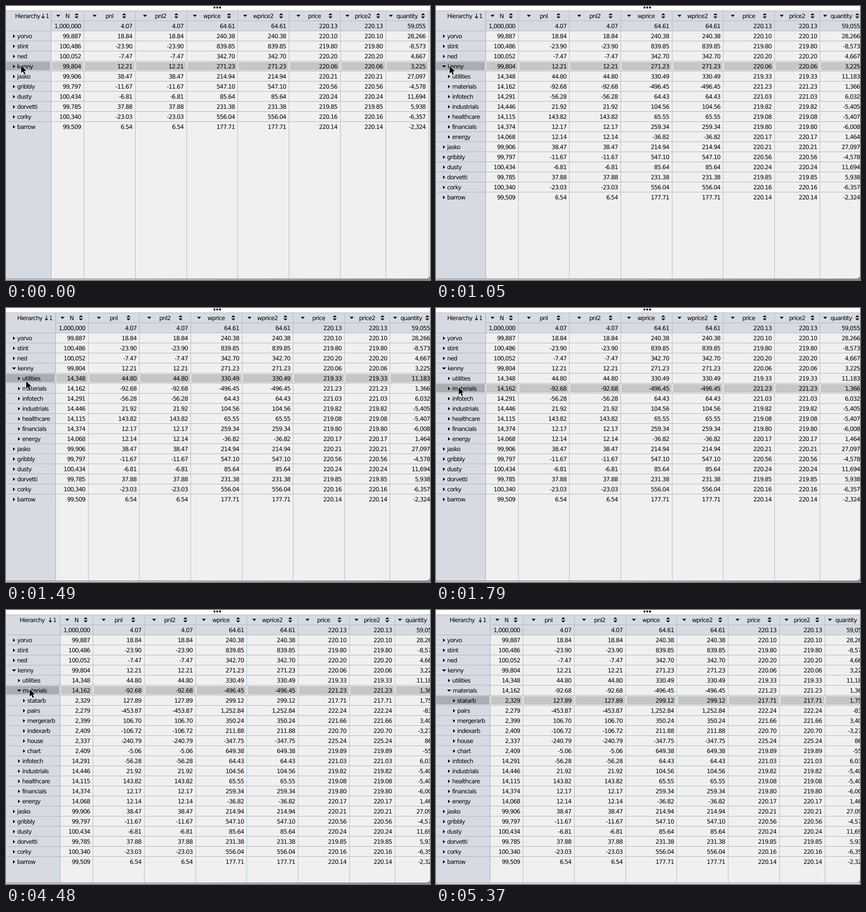
An HTML page for the animation above (8000 ms loop, 841x544 px).

```html
<!DOCTYPE html>
<html lang="en">
<head>
<meta charset="utf-8">
<title>Hierarchy table</title>
<style>
  html, body { margin: 0; width: 100%; height: 100%; overflow: hidden; background: #fff; }
  svg { display: block; }
  text {
    font: 11.7px "DejaVu Sans", Tahoma, sans-serif;
    letter-spacing: -.75px;
    text-rendering: geometricPrecision;
    white-space: pre;
  }
  .num { text-anchor: end; }
  .mid { text-anchor: middle; }
</style>
</head>
<body>
<svg id="stage" width="841" height="544" viewBox="0 0 841 544"></svg>
<script>
const stage = document.getElementById('stage');
const W = 841, TOP = 9, ROW = 20, BOTTOM = 541, LOOP = 8000;

// Leaves: name, count, pnl, weighted price, price, quantity. Parents are summed up below.
const outline = `
all
 yorvo 99887 18.84 240.376 220.10 28266
 stint 100486 -23.90 839.85 219.80 -8573
 ned 100052 -7.47 342.70 220.20 4667
 kenny
  utilities 14348 44.80 330.486 219.33 11183
  materials
   statarb 2329 127.89 299.12 217.71 1752
   pairs 2279 -453.87 1252.84 222.24 -832
   mergerarb 2399 106.70 350.24 221.66 3405
   indexarb 2409 -106.72 211.88 220.70 -3270
   house 2337 -240.79 -347.75 225.24 864
   chart 2409 -5.06 649.38 219.89 -553
  infotech 14291 -56.28 64.43 221.03 6032
  industrials 14446 21.92 104.56 219.82 -5405
  healthcare 14115 143.82 65.55 219.08 -5407
  financials 14374 12.17 259.34 219.80 -6008
  energy 14068 12.14 -36.82 220.17 1464
 jasko 99906 38.47 214.94 220.21 27097
 gribbly 99797 -11.67 547.10 220.56 -4578
 dusty 100434 -6.81 85.64 220.24 11694
 dorvetti 99785 37.88 231.38 219.85 5938
 corky 100340 -23.03 556.04 220.16 -6357
 barrow 99509 6.54 177.71 220.14 -2324`;

function parse(source) {
  const path = [];
  const nodes = source.trim().split('\n').map(line => {
    const depth = line.search(/\S/);
    const [name, ...cells] = line.trim().split(' ');
    const [N, pnl, wprice, price, quantity] = cells.map(Number);
    const node = { name, depth, kids: [], N, pnl, wprice, price, quantity };
    if (depth) path[depth - 1].kids.push(node);
    return path[depth] = node;
  });
  return nodes;
}

// Counts and quantities add up; the rest are weighted means.
function aggregate(node) {
  if (!node.kids.length) return;
  node.kids.forEach(aggregate);
  const sum = f => node.kids.reduce((total, kid) => total + f(kid), 0);
  node.N = sum(k => k.N);
  node.quantity = sum(k => k.quantity);
  for (const key of ['pnl', 'price']) node[key] = sum(k => k[key] * k.N) / node.N;
  node.wprice = sum(k => k.wprice * k.quantity) / node.quantity;
}

const nodes = parse(outline);
const [root, ...rows] = nodes;
aggregate(root);

const pen = document.createElement('canvas').getContext('2d');
pen.font = '11.7px "DejaVu Sans", Tahoma, sans-serif';
const textWidth = s => pen.measureText(s).width - .75 * s.length;

// Menu arrow, label and sorter are spaced evenly inside each heading.
const FIRST = 89.4, ICON = 10;
const widths = { N: 64.8, price2: 90.2, quantity: 84.9 };
let edge = FIRST;
const columns = ['N', 'pnl', 'pnl2', 'wprice', 'wprice2', 'price', 'price2', 'quantity'].map(name => {
  const left = edge;
  const width = widths[name] || 101.68;
  edge += width;
  const pad = (width - textWidth(name) - 2 * ICON) / 4 + ICON / 2;
  return { name, key: name.replace('2', ''), right: edge,
           menu: left + pad, mid: left + width / 2, sort: edge - pad };
});

const shifts = [0, 8.5, 18];
const opens = [[0, 0], [1050, 1], [2540, 2]];
const picks = [[0, 'kenny'], [1490, 'utilities'], [1640, 'materials'], [4630, 'statarb']];
const pointer = [
  [0, 30, 118], [300, 26, 120], [750, 27, 119], [1190, 18, 120], [1340, 20, 124],
  [1490, 40, 145], [1640, 36, 148], [1790, 45, 157], [4480, 47, 157], [4630, 765, 182], [4770]
];
const SETTLED = 5370;

const rect = (x, y, w, h, fill) =>
  `<rect x="${x}" y="${y}" width="${w}" height="${h}" fill="${fill}"/>`;
const path = (d, x, y, extra = '') =>
  `<path transform="translate(${x} ${y})" d="${d}" ${extra}/>`;
const text = (s, x, y, cls = '') => `<text class="${cls}" x="${x}" y="${y}">${s}</text>`;

const DOWN = 'M-4 -2H4L0 2.2Z';
const RIGHT = 'M-2 -3.5V3.5L2 0Z';
const SORT = 'M-4 -1.2L0 -5.2L4 -1.2ZM-4 1.2L0 5.2L4 1.2Z';
const ORDER = 'M0 -4.5V4.5M-2.8 1.5L0 4.7L2.8 1.5';
const POINTER = 'M0 0V15L3.5 11.8L6 17.4L8.4 16.3L6 10.8H10.6Z';

function format(node, key) {
  const digits = key === 'N' || key === 'quantity' ? 0 : 2;
  return node[key].toLocaleString('en-US',
    { minimumFractionDigits: digits, maximumFractionDigits: digits });
}
const values = (node, y, shift) =>
  columns.map(c => text(format(node, c.key), c.right + shift - 5.4, y, 'num')).join('');

function header(shift) {
  const order = 73.5 + shift * .8;
  return text('Hierarchy', 18 + shift / 2, 24)
    + path(ORDER, order, 19.5, 'fill="none" stroke="#000" stroke-width="1.2"')
    + text('1', order + 5, 24)
    + columns.map(c => path(DOWN, c.menu + shift, 19.5)
        + text(c.name, c.mid + shift, 24, 'mid')
        + path(SORT, c.sort + shift, 19.5)).join('')
    + values(root, 44, shift);
}

function grid(edges, left, count, open) {
  let s = rect(0, 0, W, 544, '#fff') + rect(0, TOP, W, 532, '#f0f0f0')
    + rect(0, TOP, W, 40, '#d6dbe3') + rect(0, TOP, left, 532, '#d6dbe3')
    + rect(0, TOP, W, 1, '#b0b4b9') + rect(left, 29, W, 1, '#b4b8be');
  for (let i = 0; i < 3; i++) s += `<circle cx="${413.5 + i * 5.5}" cy="3" r="2"/>`;
  for (let i = 0; i < count; i++) s += rect(0, 49 + i * ROW, W, 1, '#b4b6b9');
  edges.forEach((x, i) => {
    s += rect(x, TOP + 1, 1, 531, i ? '#b8babd' : '#a9adb3');
    if (open === 2 && i === 4) s += rect(x, 50, 1, 491, '#a6cbd8');
  });
  return s;
}

function highlight(y, edges, left) {
  let s = rect(0, y + 1, left, 18, '#fafafa') + rect(0, y + 1, left - 1, 17, '#a9aeb3');
  edges.forEach((x, i) => {
    const end = edges[i + 1] || W + 2;
    s += rect(x + 1, y, end - x - 1, 19, '#fafafa')
      + rect(x + 2, y + 1, Math.max(0, end - x - 3), 17, '#c6c6c6');
  });
  return s;
}

function footer(settled) {
  const [line, fill] = settled ? ['#a4a4a4', '#e2e2e2'] : ['#8a8a8a', 'url(#shade)'];
  return `<defs><linearGradient id="shade"><stop offset=".3" stop-color="#c9c9c9"/>
      <stop offset="1" stop-color="#8c8c8c"/></linearGradient></defs>`
    + rect(0, BOTTOM, W, 1, line) + rect(0, 542, W, 2, fill)
    + path('M-8 0Q-1 0 0 -6V0Z', W, BOTTOM, `fill="${line}"`);
}

function draw(open, picked, [, px, py], settled) {
  const shift = shifts[open];
  const left = Math.round(FIRST + shift);
  const edges = [left, ...columns.map(c => Math.round(c.right + shift))];
  const shown = rows.filter(r => r.depth <= open + 1);

  let s = grid(edges, left, shown.length, open);
  shown.forEach((r, i) => {
    const y = 50 + i * ROW, x = r.depth * 10 + 6;
    const expanded = r.kids.length && r.depth <= open;
    if (r.name === picked) s += highlight(y, edges, left);
    s += path(expanded ? DOWN : RIGHT, x, y + 10)
      + text(r.name, x + (expanded ? 7 : 6), y + 14)
      + values(r, y + 14, shift);
  });
  s += header(shift) + footer(settled);
  if (px !== undefined) {
    s += path(POINTER, px, py, 'stroke="#fff" stroke-width="1.6" paint-order="stroke"');
  }
  stage.innerHTML = s;
}

const at = (track, t) => track.findLast(k => k[0] <= t);
let drawn = '';
const began = performance.now();
function tick() {
  const t = (performance.now() - began) % LOOP;
  const state = [at(opens, t)[1], at(picks, t)[1], at(pointer, t), t >= SETTLED];
  const key = state.join();
  if (key !== drawn) {
    draw(...state);
    drawn = key;
  }
  requestAnimationFrame(tick);
}
tick();
</script>
</body>
</html>
```
